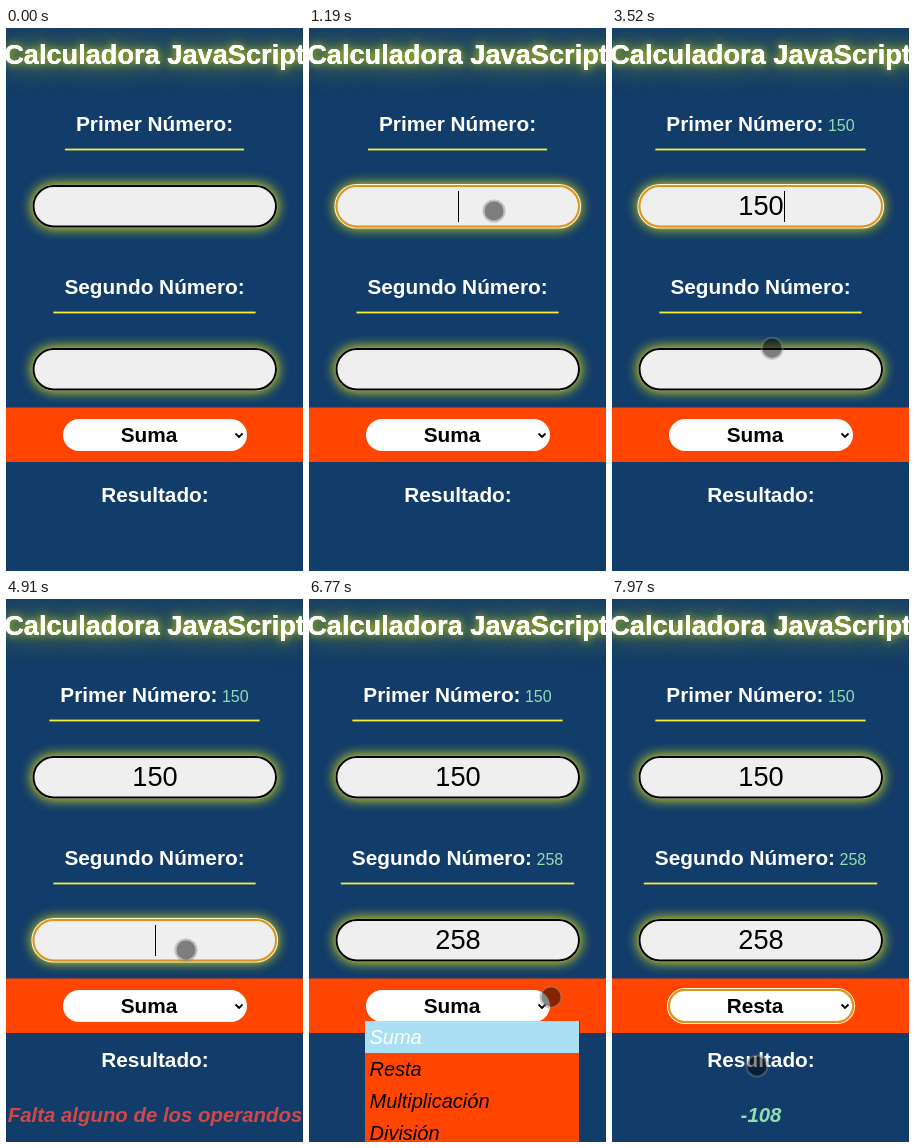
These frames come from a looping animation (297x543 px, 8 s). An HTML page with a canvas:

```html
<!DOCTYPE html>
<html lang="es">
<head>
<meta charset="utf-8">
<title>Calculadora JavaScript</title>
<style>
  html, body { margin: 0; width: 100%; height: 100%; overflow: hidden; background: #123c69; }
  canvas { display: block; width: 297px; height: 543px; }
</style>
</head>
<body>
<canvas id="stage" width="297" height="543"></canvas>
<script>
const W = 297, H = 543, LOOP = 8000, MID = 148.5;
const NAVY = '#123c69', ORANGE = '#ff4500', GREEN = '#94dcb4', YELLOW = '#ffff00';
const ctx = document.getElementById('stage').getContext('2d');

const FOCUS_1 = 1150, FOCUS_2 = 3880, OPEN = 6650, HOVER = 7840, CLOSE = 7960;
const KEYS_1 = [2190, 2320, 2520], KEYS_2 = [5110, 5310, 5510];
const CARET_OFF = [[1720, 2190], [3050, 3510], [4450, 4910], [5970, 6240]];

// Pointer keys: time, x, y
const POINTER = [
  [430, 292, 470], [560, 268, 432], [800, 216, 312], [950, 190, 236], [1050, 182, 206], [1120, 185, 183],
  [3250, 185, 183], [3330, 176, 206], [3430, 153, 284], [3520, 160, 320], [3680, 180, 351],
  [6240, 180, 351], [6380, 204, 374], [6520, 242, 398],
  [6840, 242, 398], [7040, 228, 409], [7300, 188, 446], [7570, 156, 474],
  [7840, 156, 474], [7960, 145, 467]
];

const within = (t, [a, b]) => t >= a && t < b;
const typed = (word, keys, t) => word.slice(0, keys.filter(k => t >= k).length);

function font(size, style = '') {
  ctx.font = `${style} ${size}px "Liberation Sans", Arial, sans-serif`;
}

function text(str, x, y, size, style, color, align = 'center') {
  font(size, style);
  ctx.fillStyle = color;
  ctx.textAlign = align;
  ctx.fillText(str, x, y);
  return ctx.measureText(str).width;
}

function pill(x, y, w, h, inset = 0) {
  ctx.beginPath();
  ctx.roundRect(x + inset, y + inset, w - 2 * inset, h - 2 * inset, h / 2 - inset);
}

function stroke(color, width) {
  ctx.strokeStyle = color;
  ctx.lineWidth = width;
  ctx.stroke();
}

function glow(color, blur, paint) {
  ctx.save();
  ctx.shadowColor = color;
  ctx.shadowBlur = blur;
  paint();
  ctx.restore();
}

function focusRing(x, y, w, h) {
  pill(x, y, w, h, -0.5);
  stroke('#fff6dc', 1.2);
  pill(x, y, w, h, 1);
  stroke('#dc941c', 2);
}

function title() {
  const paint = () => text('Calculadora JavaScript', MID, 36, 27.2, 'bold', '#fff');
  glow('rgba(255,255,0,.75)', 30, paint);
  glow('rgba(255,255,0,.8)', 9, paint);
  paint();
}

function label(str, value, base) {
  font(20.8, 'bold');
  const main = ctx.measureText(str).width;
  font(16);
  const extra = value ? ctx.measureText(' ' + value).width : 0;
  const full = main + extra, left = MID - full / 2;
  text(str, left, base, 20.8, 'bold', '#fff', 'left');
  if (value) text(' ' + value, left + main, base, 16, '', GREEN, 'left');
  ctx.fillStyle = '#f4f03a';
  ctx.fillRect(left - 11, base + 17.6, full + 22, 1.8);
}

function field(y, value, focused, caret) {
  const x = 26.5, w = 244.5, h = 42.5;
  glow(YELLOW, 13, () => {
    pill(x, y, w, h);
    ctx.fillStyle = '#efefef';
    ctx.fill();
  });
  if (focused) {
    focusRing(x, y, w, h);
  } else {
    pill(x, y, w, h, 1);
    stroke('#000', 2);
  }
  const width = text(value, 149, y + 30, 27.2, '', '#000');
  if (focused && caret) {
    ctx.fillStyle = '#000';
    ctx.fillRect(Math.round(149 + width / 2), y + 6, 1, 31);
  }
}

function select(value, focused) {
  ctx.fillStyle = ORANGE;
  ctx.fillRect(0, 379.5, W, 54.5);
  pill(57, 391, 184, 32);
  ctx.fillStyle = '#fff';
  ctx.fill();
  if (focused) focusRing(56, 390, 186, 34);
  text(value, 143, 414, 20.8, 'bold', '#000');
  ctx.beginPath();
  ctx.moveTo(229.5, 405.5);
  ctx.lineTo(233, 409);
  ctx.lineTo(236.5, 405.5);
  stroke('#000', 1.8);
}

function menu(active) {
  ctx.fillStyle = ORANGE;
  ctx.fillRect(56, 422, 214, H - 422);
  ['Suma', 'Resta', 'Multiplicación', 'División'].forEach((name, i) => {
    const y = 422 + 32 * i, on = i === active;
    if (on) {
      ctx.fillStyle = '#abdff4';
      ctx.fillRect(56, y, 214, 32);
    }
    text(name, 60.5, y + 23, 20, 'italic', on ? '#fff' : '#000', 'left');
  });
  ctx.fillStyle = 'rgba(60,50,50,.6)';
  ctx.fillRect(270, 422, 1, H - 422);
}

function result(t) {
  const failed = t >= FOCUS_2 && t < OPEN;
  text('Resultado:', 149, t < FOCUS_2 ? 474 : 468, 20.8, 'bold', '#fff');
  if (failed) text('Falta alguno de los operandos', MID + 0.5, 523, 20.4, 'italic bold', '#d04848');
  else if (t >= OPEN) text(t < CLOSE ? '408' : '-108', 149, 523, 20.4, 'italic bold', GREEN);
}

function pointer(t) {
  if (t < POINTER[0][0]) return;
  let i = POINTER.findIndex(k => k[0] > t);
  if (i < 0) i = POINTER.length;
  const a = POINTER[i - 1], b = POINTER[i] || a;
  const p = b === a ? 0 : (t - a[0]) / (b[0] - a[0]);
  const x = a[1] + (b[1] - a[1]) * p, y = a[2] + (b[2] - a[2]) * p;
  ctx.beginPath();
  ctx.arc(x, y, 9.7, 0, 7);
  ctx.fillStyle = 'rgba(0,0,0,.47)';
  ctx.fill();
  ctx.beginPath();
  ctx.arc(x, y, 10.6, 0, 7);
  stroke('rgba(128,128,118,.42)', 1.9);
}

function draw(t) {
  const a = typed('150', KEYS_1, t), b = typed('258', KEYS_2, t);
  const caret = !CARET_OFF.some(span => within(t, span));
  const open = within(t, [OPEN, CLOSE]);
  ctx.fillStyle = NAVY;
  ctx.fillRect(0, 0, W, H);
  title();
  label('Primer Número:', a, 103);
  field(157, a, within(t, [FOCUS_1, FOCUS_2]), caret);
  label('Segundo Número:', b, 266);
  field(320, b, within(t, [FOCUS_2, OPEN]), caret);
  select(t < CLOSE ? 'Suma' : 'Resta', t >= CLOSE);
  result(t);
  if (open) menu(t < HOVER ? 0 : 1);
  pointer(t);
}

const start = performance.now();
function frame() {
  draw((performance.now() - start) % LOOP);
  requestAnimationFrame(frame);
}
frame();
</script>
</body>
</html>
```
